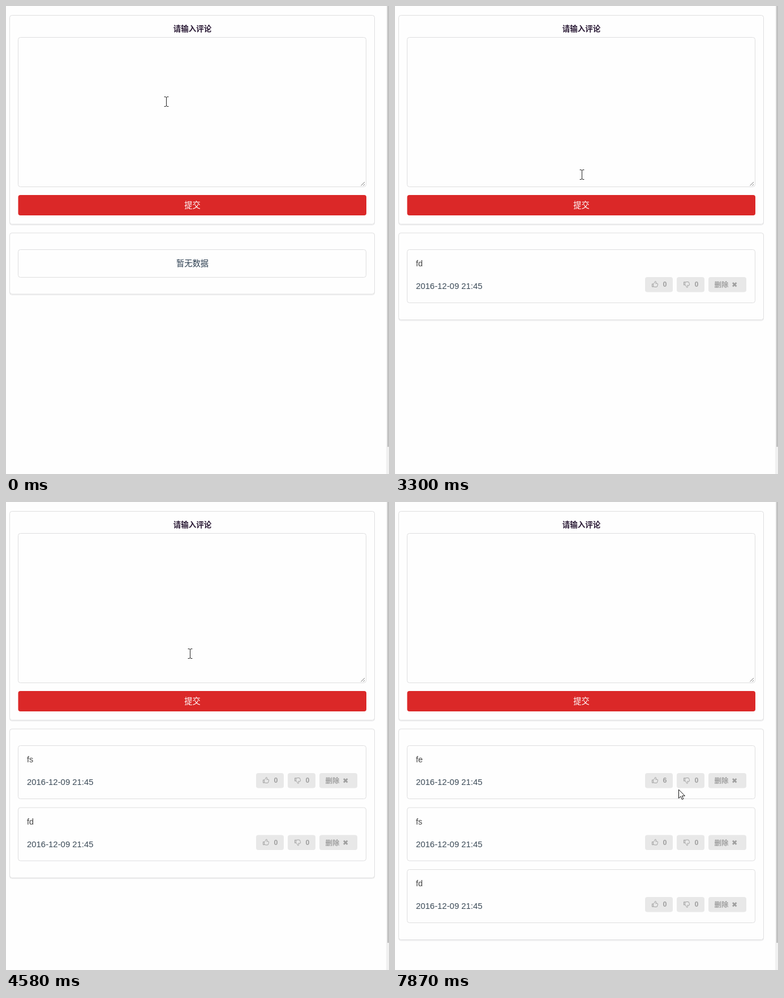
Animation, 677 px wide and 827 px high, one loop 8000 ms. Source, as an HTML page:

```html
<!DOCTYPE html>
<html lang="zh-CN">
<head>
<meta charset="utf-8">
<title>评论</title>
<style>
  html, body { margin: 0; width: 100%; height: 100%; overflow: hidden; background: #fefefe; }
  svg { display: block; width: 677px; height: 827px; }
  text { font-family: "Liberation Sans", Arial, "Noto Sans CJK SC", "Noto Sans CJK", sans-serif; }
  .box { fill: #fefefe; stroke: #dededf; }
  .center { text-anchor: middle; }
  .label text { font-size: 12.4px; font-weight: 700; fill: #a0a0a0; }
  .label path { fill: none; stroke: #a0a0a0; stroke-linejoin: round; }
  .pointer path { stroke-linejoin: round; stroke-linecap: round; }
</style>
</head>
<body>
<svg id="stage" viewBox="0 0 677 827" xmlns="http://www.w3.org/2000/svg"></svg>
<script>
const LOOP = 8000;
const ROW_PITCH = 109.5;
const RED = '#db2828', DARK_RED = '#d01919', MID_RED = '#d82424';

// Each entry changes part of the state at its time and holds until the next.
const timeline = [
  [0, { text: '', focus: false, caret: false, button: RED, rows: [], likes: 0, pointer: ['beam', 283, 169] }],
  [930, { focus: true, caret: true }],
  [1290, { text: 'f' }],
  [1480, { text: 'fd' }],
  [2030, { caret: false, pointer: ['beam', 288, 195] }],
  [2210, { pointer: ['beam', 315, 285] }],
  [2390, { pointer: ['arrow', 338, 391] }],
  [2570, { caret: true, button: DARK_RED, pointer: ['hand', 341, 366] }],
  [2750, { pointer: ['hand', 342, 363] }],
  [2930, { focus: false, caret: false }],
  [3110, { text: '', rows: ['fd'] }],
  [3290, { button: RED, pointer: ['beam', 330, 298] }],
  [3480, { focus: true, caret: true, pointer: ['beam', 321, 268] }],
  [3660, { text: 'f' }],
  [3840, { text: 'fs' }],
  [4030, { pointer: ['beam', 322, 290] }],
  [4210, { button: MID_RED, pointer: ['hand', 324, 349] }],
  [4390, { text: '', focus: false, caret: false, button: DARK_RED, rows: ['fs', 'fd'] }],
  [4580, { button: RED, pointer: ['beam', 325, 268] }],
  [4760, { focus: true, caret: true }],
  [4940, { text: 'f' }],
  [5120, { text: 'fe' }],
  [5300, { pointer: ['beam', 324, 300] }],
  [5480, { button: DARK_RED, pointer: ['hand', 322, 350] }],
  [5660, { focus: false, caret: false }],
  [5850, { text: '', rows: ['fe', 'fs', 'fd'] }],
  [6030, { pointer: ['hand', 322, 353] }],
  [6210, { button: RED, pointer: ['hand', 342, 365] }],
  [6390, { pointer: ['arrow', 412, 414] }],
  [6570, { pointer: ['arrow', 489, 463] }],
  [6750, { pointer: ['hand', 459, 487] }],
  [6930, { likes: 1 }],
  [7120, { likes: 2 }],
  [7320, { likes: 3 }],
  [7500, { likes: 5 }],
  [7690, { likes: 6 }],
  [7870, { pointer: ['arrow', 501, 508] }],
];

const stage = document.getElementById('stage');

const box = (x, y, w, h, attrs = 'class="box"') =>
  `<rect x="${x}" y="${y}" width="${w}" height="${h}" rx="4" ${attrs}/>`;

const text = (x, y, size, fill, content, attrs = '') =>
  `<text x="${x}" y="${y}" font-size="${size}" fill="${fill}" ${attrs}>${content}</text>`;

// Bordered panel with a soft line below its bottom edge.
const card = (y, h) =>
  box(6.5, y + 1.5, 645, h, 'fill="none" stroke="#222426" stroke-opacity=".1"') + box(6.5, y, 645, h);

const thumbPath = 'M.5 5H2.6V10.2H.5ZM2.6 5.2L4.8 3Q5.2 .6 6.2 .5Q8 .8 7.4 2.8L6.9 4.3H9.8' +
  'Q11.2 4.8 10.4 6.2Q10.8 7.2 9.9 8Q10 10.5 8 10.5H6Q4 10.4 2.6 9.8';

function voteLabel(x, y, count, down) {
  const icon = down ? `translate(${x + 12} ${y + 19}) scale(1 -1)` : `translate(${x + 12} ${y + 7})`;
  return box(x, y, 49, 26.5, 'fill="#e8e8e8"') +
    `<path d="${thumbPath}" transform="${icon}"/>` +
    `<text x="${x + 31.5}" y="${y + 17.3}">${count}</text>`;
}

function deleteLabel(x, y) {
  return box(x, y, 67, 26.5, 'fill="#e8e8e8"') +
    `<text x="${x + 10.5}" y="${y + 18}">删除</text>` +
    `<path d="M${x + 43} ${y + 10}l6.4 6.4m0 -6.4l-6.4 6.4" stroke-width="2.8"/>`;
}

function commentRow(comment, index, likes) {
  const y = 430.5 + index * ROW_PITCH;
  return box(21.5, y, 615, 94) +
    text(37, y + 29.5, 14.4, '#444', comment) +
    text(37, y + 69.5, 14.9, '#3b4a57', '2016-12-09 21:45') +
    `<g class="label">${voteLabel(442, y + 48.5, likes)}${voteLabel(498, y + 48.5, 0, true)}` +
    `${deleteLabel(554, y + 48.5)}</g>`;
}

function commentList({ rows, likes }) {
  if (!rows.length) {
    return card(401, 108) + box(21.5, 430.5, 615, 49) +
      text(329.5, 459.8, 14.3, '#2c3e50', '暂无数据', 'class="center"');
  }
  return card(401, 44 + rows.length * ROW_PITCH) +
    rows.map((comment, i) => commentRow(comment, i, i ? 0 : likes)).join('');
}

function form({ text: value, focus, caret, button }) {
  const advance = [...value].reduce((sum, c) => sum + ({ f: 4, s: 7 }[c] || 8), 0);
  return card(16.5, 369) +
    text(329.5, 45, 13.5, '#2b1b36', '请输入评论', 'class="center" font-weight="700"') +
    box(21.5, 55.5, 615, 264, `fill="#fefefe" stroke="${focus ? '#85b7d9' : '#dededf'}"`) +
    '<path d="M627.5 317.5l6.5 -6.5M631.5 317.5l2.5 -2.5" stroke="#777"/>' +
    text(37, 81, 14.4, '#222', value) +
    (caret ? `<rect x="${37 + advance}" y="68" width="1" height="16" fill="#000"/>` : '') +
    box(21.5, 334, 615.5, 36, `fill="${button}"`) +
    text(329.5, 357.3, 14.3, '#fff', '提交', 'class="center"');
}

const pointers = {
  beam: '<path d="M-3 -8.5H-1L0.5 -7.5L2 -8.5H4M.5 -7.5V7.5M-3 8.5H-1L.5 7.5L2 8.5H4" fill="none" stroke="#222"/>',
  arrow: '<path d="M.5 .5V15.5L4 12.2L6.4 17.6L8.8 16.6L6.4 11.3H11Z" fill="#fff" stroke="#111"/>',
  hand: '<path d="M-1.5 13V2Q-1.5 .5 0 .5T1.5 2V7Q3.5 5.8 4.5 7.6Q6.4 6.6 7.4 8.4Q10.3 7.8 10.5 10.5' +
    'V14.5L8.5 18.5V21.5H.5V19.5L-4.5 12.5Q-5 10 -3 10.2L-1.5 12Z" fill="#fff" stroke="#111"/>' +
    '<path d="M1.5 7V10.5M4.5 8V11M7.5 9V11.5" fill="none" stroke="#111"/>',
};

const pointer = ([kind, x, y]) =>
  `<g class="pointer" transform="translate(${x} ${y})">${pointers[kind]}</g>`;

const scrollbar = '<path d="M672 0h5v827h-5z" fill="#f1f1f1"/><path d="M674 0h3v779h-3z" fill="#c1c1c1"/>';

const stateAt = time =>
  Object.assign({}, ...timeline.filter(([at]) => at <= time).map(([, change]) => change));

let shown = '';
function render(time) {
  const state = stateAt(time);
  const markup = scrollbar + form(state) + commentList(state) + pointer(state.pointer);
  if (markup !== shown) stage.innerHTML = shown = markup;
}

const start = performance.now();
function tick() {
  render((performance.now() - start) % LOOP);
  requestAnimationFrame(tick);
}
tick();
</script>
</body>
</html>
```
